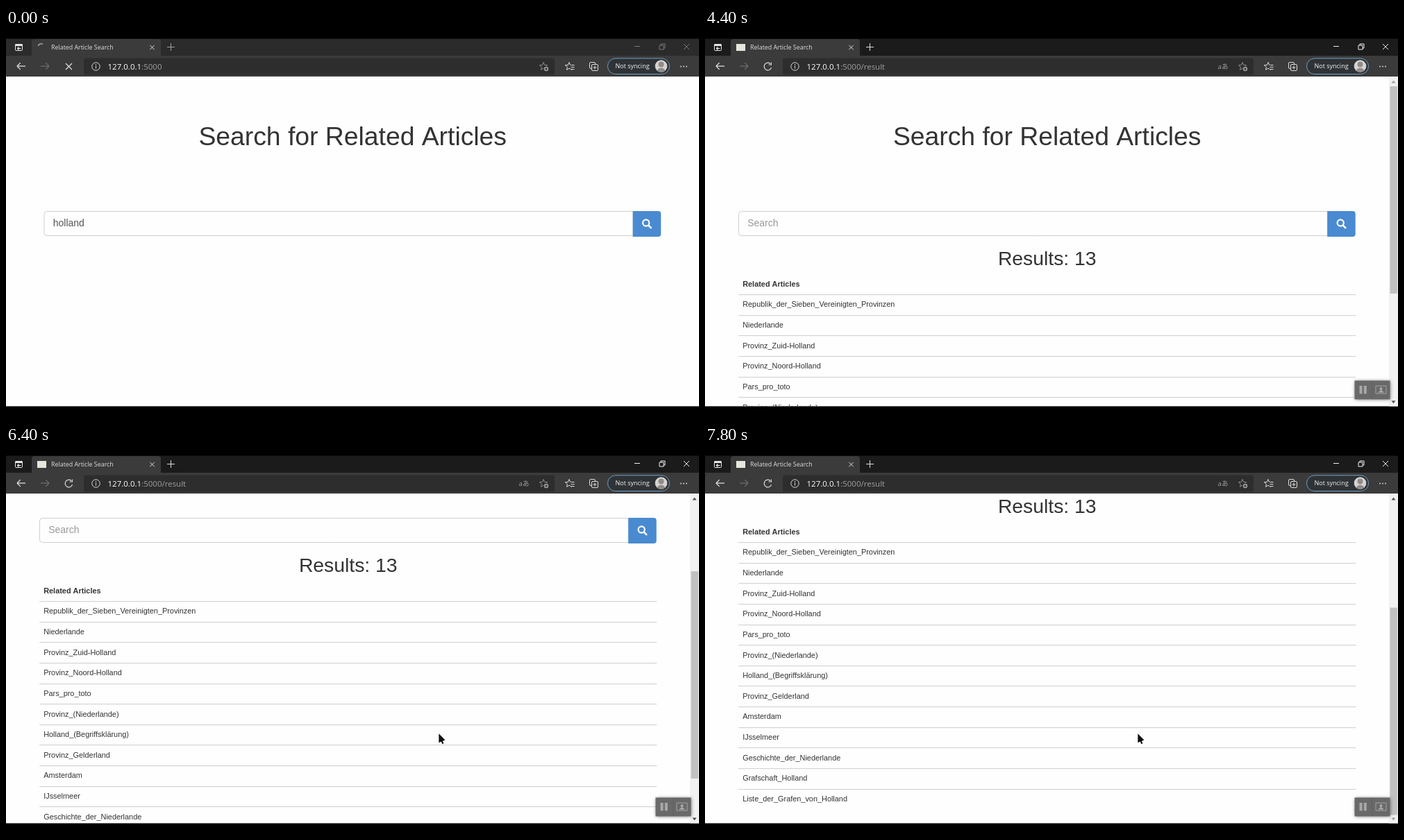
An HTML page with a canvas that plays this animation: 998x561 px, repeating every 8000 ms.

```html
<!DOCTYPE html>
<html lang="en">
<head>
<meta charset="utf-8">
<title>Related Article Search</title>
<style>
html, body { margin: 0; width: 100%; height: 100%; overflow: hidden; background: #000; }
canvas { display: block; width: 998px; height: 561px; }
</style>
</head>
<body>
<canvas id="stage"></canvas>
<script>
const W = 998, H = 561, LOOP = 8000, STEP = 200;
const TAB_Y = 27.5, BAR_Y = 55.5, TOP = 70, BOTTOM = 545.5;
const LOADED = 3400, CURSOR_AT = 4600, MAX_SCROLL = 244;
const SCROLL = [[4400, 0], [5600, 124], [6400, 159], [6800, 210], [7800, MAX_SCROLL]];
const ROW_H = 29.63, FORM_W = 889;
const ROWS = [
  'Republik_der_Sieben_Vereinigten_Provinzen', 'Niederlande', 'Provinz_Zuid-Holland',
  'Provinz_Noord-Holland', 'Pars_pro_toto', 'Provinz_(Niederlande)',
  'Holland_(Begriffsklärung)', 'Provinz_Gelderland', 'Amsterdam', 'IJsselmeer',
  'Geschichte_der_Niederlande', 'Grafschaft_Holland', 'Liste_der_Grafen_von_Holland'
];
const SANS = 'px "Liberation Sans", Arial, sans-serif';
const UI = 'px "Open Sans", "Noto Sans", sans-serif';
const PALE = '#dcdcdc', DIM = '#8c8c8c', CHROME = '#3b3b3b', FIELD = '#2d2d2d';
const TAU = 2 * Math.PI;

const canvas = document.getElementById('stage');
const ctx = canvas.getContext('2d');
const dpr = window.devicePixelRatio || 1;
canvas.width = W * dpr;
canvas.height = H * dpr;

function at(x, y, paint) {
  ctx.save();
  ctx.translate(x, y);
  paint();
  ctx.restore();
}

function rect(x, y, w, h, color) {
  ctx.fillStyle = color;
  ctx.fillRect(x, y, w, h);
}

function box(x, y, w, h, radius, fill, edge) {
  ctx.beginPath();
  ctx.roundRect(x, y, w, h, radius);
  if (fill) { ctx.fillStyle = fill; ctx.fill(); }
  if (edge) { ctx.strokeStyle = edge; ctx.lineWidth = 1; ctx.stroke(); }
}

function text(str, x, y, font, color, align = 'left') {
  ctx.font = font;
  ctx.fillStyle = color;
  ctx.textAlign = align;
  ctx.fillText(str, x, y);
}

function line(x0, y0, x1, y1, color, width = 1) {
  ctx.beginPath();
  ctx.moveTo(x0, y0);
  ctx.lineTo(x1, y1);
  ctx.strokeStyle = color;
  ctx.lineWidth = width;
  ctx.stroke();
}

function ring(r, color, width = 1, from = 0, to = TAU) {
  ctx.beginPath();
  ctx.arc(0, 0, r, from, to);
  ctx.strokeStyle = color;
  ctx.lineWidth = width;
  ctx.stroke();
}

function disc(x, y, r, color) {
  ctx.beginPath();
  ctx.arc(x, y, r, 0, TAU);
  ctx.fillStyle = color;
  ctx.fill();
}

function plus(r, color, width = 1) {
  line(-r, 0, r, 0, color, width);
  line(0, -r, 0, r, color, width);
}

function cross(r, color, width = 1) {
  line(-r, -r, r, r, color, width);
  line(r, -r, -r, r, color, width);
}

function arrow(size, dir, color) {
  const tip = dir * size;
  line(-tip, 0, tip, 0, color, 1.2);
  for (const s of [-1, 1]) line(tip, 0, tip - dir * size * 0.8, s * size * 0.8, color, 1.2);
}

function triangle(w, h, color) {
  ctx.beginPath();
  ctx.moveTo(0, -h / 2);
  ctx.lineTo(w / 2, h / 2);
  ctx.lineTo(-w / 2, h / 2);
  ctx.fillStyle = color;
  ctx.fill();
}

function star(r, color) {
  ctx.beginPath();
  for (let i = 0; i < 10; i++) {
    const a = i * TAU / 10 - TAU / 4, d = i % 2 ? r * 0.45 : r;
    ctx.lineTo(d * Math.cos(a), d * Math.sin(a));
  }
  ctx.closePath();
  ctx.strokeStyle = color;
  ctx.lineWidth = 1;
  ctx.stroke();
}

function scrollAt(t) {
  const next = SCROLL.findIndex(([time]) => t < time);
  if (next < 0) return MAX_SCROLL;
  if (next === 0) return 0;
  const [t0, y0] = SCROLL[next - 1], [t1, y1] = SCROLL[next];
  return y0 + (y1 - y0) * (t - t0) / (t1 - t0);
}

function spinner(t) {
  const turn = TAU * (0.695 - 0.132 * Math.min(t, 3000) / STEP);
  ring(5.3, '#b0b0b0', 1.5, turn - 0.75, turn + 0.75);
}

function drawTabs(t, loaded) {
  const button = loaded ? '#f0f0f0' : '#777';
  rect(0, 15.5, W, 25, loaded ? '#1b1b1b' : '#2b2b2b');
  box(37, 16, 186, 26, [4, 4, 0, 0], CHROME);
  at(18.5, TAB_Y + 0.5, () => {
    box(-5, -4.5, 10, 9, 1, null, '#e6e6e6');
    rect(-5, -5, 10, 3, '#e6e6e6');
    at(0.5, 1.5, () => arrow(2.5, -1, '#e6e6e6'));
  });
  if (loaded) rect(45, 23, 13, 10, '#e6e6dc');
  else at(51, TAB_Y + 0.5, () => spinner(t));
  text('Related Article Search', 65, 31, 8.9 + UI, '#dedede');
  at(210.5, TAB_Y + 0.5, () => cross(3.2, PALE));
  at(237.5, TAB_Y, () => plus(5.5, loaded ? PALE : '#a0a0a0'));

  at(909, TAB_Y - 1, () => line(-4, 0, 4, 0, button));
  at(944.5, TAB_Y - 0.5, () => {
    box(-1.5, -4, 6, 6, 0, null, button);
    box(-3.5, -2, 6, 6, 0, loaded ? '#1b1b1b' : '#2b2b2b', button);
  });
  at(980, TAB_Y - 0.5, () => cross(4, button));
}

function drawAddress(loaded) {
  const host = '127.0.0.1', x = 146.5, y = 60;
  box(112, 43.5, 678, 24, 3, FIELD);
  at(129.5, BAR_Y, () => {
    ring(5.7, PALE);
    line(0, -1, 0, 3, PALE);
    line(0, -3.5, 0, -2, PALE);
  });
  text(host, x, y, '500 ' + 11.5 + UI, '#fff');
  const end = x + ctx.measureText(host).width;
  text(loaded ? ':5000/result' : ':5000', end, y, 11.5 + UI, '#a0a0a0');
  if (loaded) text('aあ', 746, 58.5, '9.5px "Open Sans", "Noto Sans CJK JP", sans-serif', '#a0a0a0', 'center');
  at(774, BAR_Y, () => star(6, DIM));
  at(778, BAR_Y + 3.5, () => {
    disc(0, 0, 4, FIELD);
    disc(0, 0, 3.2, '#a0a0a0');
    plus(2, FIELD);
  });
}

function drawAvatar() {
  ctx.beginPath();
  ctx.arc(0, 0, 9, 0, TAU);
  ctx.clip();
  disc(0, 0, 9, '#d6d4d2');
  disc(0, -2.5, 4, '#8f8c8a');
  disc(0, 9, 6.5, '#8f8c8a');
}

function drawToolbar(loaded) {
  rect(0, 40, W, TOP - 40, CHROME);
  at(22, BAR_Y - 0.5, () => arrow(6, -1, '#e8e8e8'));
  at(56, BAR_Y - 0.5, () => arrow(6, 1, '#707070'));
  at(90.5, BAR_Y, () => {
    if (!loaded) return cross(4.5, PALE, 1.2);
    ring(5.3, PALE, 1.2, 0.3, 5.5);
    line(5, -6, 5, -2, PALE);
    line(5, -2.5, 1, -2.5, PALE);
  });
  drawAddress(loaded);
  at(811, BAR_Y, () => {
    star(6, PALE);
    rect(2, -3.5, 6, 8, CHROME);
    for (let y = -2; y <= 4; y += 3) line(2.5, y, 7.5, y, PALE);
  });
  at(846, BAR_Y, () => {
    box(-5.5, -6, 8, 9, 1.5, null, PALE);
    box(-2.5, -3, 9, 9, 1.5, CHROME, PALE);
    at(2, 1.5, () => plus(2.5, PALE));
  });
  box(866.5, 43.8, 89, 22.7, 11.3, '#2f3336', '#6f9fc5');
  text('Not syncing', 877.5, 58.3, '500 ' + 9 + UI, '#f4f4f4');
  at(943.5, BAR_Y - 0.5, drawAvatar);
  for (let i = -1; i <= 1; i++) disc(976 + 4 * i, BAR_Y, 0.9, PALE);
}

function drawForm(left, loaded) {
  text(loaded ? 'Search' : 'holland', left + 13, 286, 14 + SANS, loaded ? '#999' : '#555');
  box(left + 0.3, 264.5, 848, 35, [4, 0, 0, 4], null, '#cfcfcf');
  box(left + 848, 264, 40.5, 37, [0, 4, 4, 0], '#4a8ad0');
  at(left + 867, 281, () => {
    ring(4.6, '#fff', 2.1);
    line(3.3, 3.3, 7.8, 7.8, '#fff', 2.6);
  });
}

function drawResults(left, mid, scroll) {
  text('Results: 13', mid, 341.5, 28.3 + SANS, '#333', 'center');
  text('Related Articles', left + 6, 372.7, 'bold ' + 10.9 + SANS, '#333');
  ROWS.forEach((row, i) => {
    const y = 384 + i * ROW_H;
    rect(left, Math.round(y - scroll) + scroll, FORM_W, 1.2, '#d4d4d4');
    text(row, left + 6, y + 18.4, 10.9 + SANS, '#333');
  });
}

function drawPage(loaded, scroll) {
  const left = loaded ? 48.2 : 54.7, mid = left + FORM_W / 2;
  ctx.save();
  ctx.beginPath();
  ctx.rect(0, TOP, W, BOTTOM - TOP);
  ctx.clip();
  rect(0, TOP, W, H, '#fefefe');
  ctx.translate(0, -scroll);
  text('Search for Related Articles', mid, 168.5, 37.3 + SANS, '#333', 'center');
  drawForm(left, loaded);
  if (loaded) drawResults(left, mid, scroll);
  ctx.restore();
}

function drawScrollbar(scroll) {
  const shade = active => active ? '#505050' : '#a3a3a3';
  rect(985, TOP, 13, BOTTOM - TOP, '#f1f1f1');
  rect(986.5, 84 + scroll * 0.617, 10.5, 299, '#c1c1c1');
  at(991.5, 77.5, () => triangle(6, 4, shade(scroll > 0)));
  at(991.5, 539.5, () => triangle(6, -4, shade(scroll < MAX_SCROLL)));
}

function drawRecorder(alpha) {
  ctx.globalAlpha = alpha;
  ctx.shadowColor = 'rgba(0,0,0,.6)';
  ctx.shadowBlur = 5 * dpr;
  rect(935.5, 508.5, 51, 27, '#696969');
  ctx.shadowColor = 'transparent';
  line(961, 509, 961, 535, '#606060');
  for (const x of [942.5, 948.8]) rect(x, 516, 4, 11.5, '#a8a8a8');
  at(973.5, 521.7, () => {
    box(-7.5, -5.5, 15, 11, 0, null, '#a2a2a2');
    disc(0, -1.5, 2, '#a8a8a8');
    at(0, 2, () => triangle(9, 4, '#a8a8a8'));
  });
}

function drawCursor() {
  const size = 13;
  ctx.beginPath();
  ctx.moveTo(0, 0);
  ctx.lineTo(0, size);
  ctx.lineTo(size * 0.7, size * 0.7);
  ctx.closePath();
  ctx.strokeStyle = '#fff';
  ctx.stroke();
  ctx.fillStyle = '#111';
  ctx.fill();
  line(3, 7, 6, 14.5, '#111', 2.2);
}

function draw(t) {
  const loaded = t >= LOADED, scroll = scrollAt(t);
  ctx.setTransform(dpr, 0, 0, dpr, 0, 0);
  rect(0, 0, W, H, '#000');
  drawPage(loaded, scroll);
  if (loaded) drawScrollbar(scroll);
  drawTabs(t, loaded);
  drawToolbar(loaded);
  at(0, 0, () => drawRecorder(loaded ? 1 : 0.5 * Math.min(1, t / 600)));
  if (t >= CURSOR_AT) at(623.3, 416.3, drawCursor);
}

function tick(now) {
  draw(Math.floor((now % LOOP) / STEP) * STEP);
  requestAnimationFrame(tick);
}
requestAnimationFrame(tick);
</script>
</body>
</html>
```
